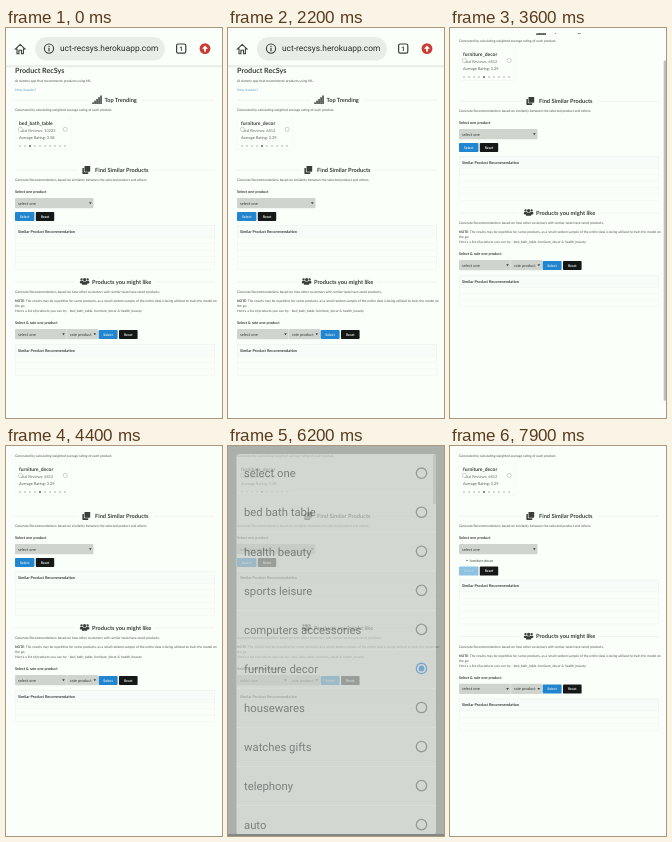
Recreate the animation shown at these times as an HTML page with a canvas. Size 216 by 390 pixels, loop 8 s.

```html
<!DOCTYPE html>
<html lang="en">
<head>
<meta charset="utf-8">
<title>Product RecSys</title>
<style>
  html, body { margin: 0; width: 100%; height: 100%; overflow: hidden; background: #fafffa; }
  canvas { display: block; width: 100vw; height: 100vh; }
</style>
</head>
<body>
<canvas id="stage"></canvas>
<script>
const W = 216, H = 390, LOOP = 8000, STEP = 100;
const BG = '#fafffa', DARK = '#2b2d2b', INK = '#3a3d3a', SOFT = '#505350';
const GREY = '#d0d4cf', BLUE = '#2185d0', BLACK = '#161817';
const LATO = 'Lato, sans-serif', ROBOTO = 'Roboto, sans-serif';
const canvas = document.getElementById('stage');
const ctx = canvas.getContext('2d');

const slides = [
  ['bed_bath_table', '10223', '3.58'],
  ['sports_leisure', '7529', '3.41'],
  ['furniture_decor', '6812', '3.29']
];
const options = ['select one', 'bed bath table', 'health beauty', 'sports leisure',
  'computers accessories', 'furniture decor', 'housewares', 'watches gifts', 'telephony', 'auto'];

// Linear interpolation through [time, value] pairs.
function keys(t, points) {
  let [t0, v0] = points[0];
  if (t <= t0) return v0;
  for (const [t1, v1] of points) {
    if (t <= t1) return v0 + (v1 - v0) * (t - t0) / (t1 - t0);
    t0 = t1;
    v0 = v1;
  }
  return v0;
}

function text(str, x, y, size, { bold = false, color = INK, font = LATO, align = 'left' } = {}) {
  ctx.font = `${bold ? 'bold ' : ''}${size}px ${font}`;
  ctx.fillStyle = color;
  ctx.textAlign = align;
  ctx.fillText(str, x, y + size * 0.34);
}

function rect(x, y, w, h, color) {
  ctx.fillStyle = color;
  ctx.fillRect(x, y, w, h);
}

function round(x, y, w, h, r, color) {
  ctx.fillStyle = color;
  ctx.beginPath();
  ctx.roundRect(x, y, w, h, r);
  ctx.fill();
}

function disc(x, y, r, color) {
  ctx.fillStyle = color;
  ctx.beginPath();
  ctx.arc(x, y, r, 0, Math.PI * 2);
  ctx.fill();
}

function ring(x, y, r, width, color) {
  ctx.strokeStyle = color;
  ctx.lineWidth = width;
  ctx.beginPath();
  ctx.arc(x, y, r, 0, Math.PI * 2);
  ctx.stroke();
}

function path(d, color, width) {
  const shape = new Path2D(d);
  if (width) {
    ctx.strokeStyle = color;
    ctx.lineWidth = width;
    ctx.stroke(shape);
  } else {
    ctx.fillStyle = color;
    ctx.fill(shape);
  }
}

function toolbar() {
  const icon = '#3c403c';
  rect(0, 0, W, 38, BG);
  const shade = ctx.createLinearGradient(0, 37.5, 0, 40);
  shade.addColorStop(0, 'rgba(60,70,60,.16)');
  shade.addColorStop(1, 'rgba(60,70,60,0)');
  rect(0, 37.5, W, 2.5, shade);
  path('M9.4 21H11V25.8H12.9V22.2H15.5V25.8H17.4V21H19L14.2 16.4Z', icon, 1.1);
  round(29, 9, 130, 23.6, 11.8, '#e8ede7');
  ring(43, 20.6, 4.6, 1.1, icon);
  rect(42.4, 17.9, 1.2, 1.3, icon);
  rect(42.4, 20, 1.2, 3.3, icon);
  text('uct-recsys.herokuapp.com', 54, 20.5, 8.35, { color: DARK, font: ROBOTO });
  ctx.strokeStyle = icon;
  ctx.lineWidth = 1.2;
  ctx.beginPath();
  ctx.roundRect(170.6, 16, 9.2, 9.2, 1.6);
  ctx.stroke();
  text('1', 175.2, 20.6, 6.5, { bold: true, color: icon, font: ROBOTO, align: 'center' });
  disc(199, 20.6, 5.4, '#cf3a34');
  path('M199 17.4L202 20.7H200V23.4H198V20.7H196Z', BG);
}

function heading(label, x, y, left, right) {
  const line = 'rgba(34,36,38,.09)';
  rect(9, y - 0.2, left - 9, 0.6, line);
  rect(right, y - 0.2, 209 - right, 0.6, line);
  text(label, x, y, 5.7, { bold: true });
}

function signalIcon() {
  for (let i = 0; i < 5; i++) {
    const h = 1.7 + i * 1.7;
    rect(86.3 + i * 2, 76 - h, 1.5, h, INK);
  }
}

function cloneIcon() {
  round(76.4, 140, 5.9, 5.9, 0.6, INK);
  round(77.9, 137.6, 6.6, 6.6, 0.6, BG);
  round(78.5, 138, 5.7, 5.7, 0.6, INK);
}

function usersIcon() {
  for (const x of [75.6, 81.6]) {
    disc(x, 251.4, 1.2, INK);
    round(x - 1.8, 253, 3.6, 2.4, 1, INK);
  }
  disc(78.6, 251.8, 1.9, BG);
  disc(78.6, 251.6, 1.6, INK);
  round(76, 253.6, 5.2, 3.2, [1.6, 1.6, 0.5, 0.5], INK);
}

function carousel(pos, dot) {
  rect(8.8, 88, 56.4, 34, 'rgba(34,36,38,.04)');
  rect(9.2, 88.2, 55.5, 33.2, BG);
  ctx.save();
  ctx.beginPath();
  ctx.rect(9, 88, 56, 26);
  ctx.clip();
  slides.forEach(([name, reviews, rating], i) => {
    const x = 13 + (i - pos) * 56;
    text(name, x, 95.2, 4.95, { bold: true });
    text('Total Reviews: ' + reviews, x, 102.7, 3.9, { color: '#6a6d6a' });
    text('Average Rating: ' + rating, x, 110, 3.9, { color: '#5a5d5a' });
  });
  ctx.restore();
  for (const x of [14.4, 59.2]) {
    disc(x, 101.4, 2.1, BG);
    ring(x, 101.4, 2.1, 0.5, '#a3a7a3');
  }
  for (let i = 0; i < 10; i++) {
    const on = i === dot;
    disc(14 + i * 5, 118, on ? 1 : 0.8, on ? '#606460' : '#a3a7a3');
  }
}

function select(label, x, y, w) {
  round(x, y, w, 10.2, 0.8, GREY);
  text(label, x + 3, y + 5.2, 4);
  const cx = x + w - 3.2, cy = y + 4.3;
  path(`M${cx - 1.3} ${cy}h2.6l-1.3 1.9z`, INK);
}

function button(label, x, y, w, color) {
  round(x, y, w, 9, 0.9, color);
  text(label, x + w / 2, y + 4.5, 3.5, { bold: true, color: '#e8eeea', align: 'center' });
}

function table(y, rows) {
  const line = 'rgba(34,36,38,.06)', h = 12 + rows * 6.4;
  rect(9, y, 200, 12, '#f7fcf8');
  for (let i = 0; i <= rows; i++) rect(9, y + 12 + i * 6.4, 200, 0.5, line);
  rect(9, y, 200, 0.5, line);
  rect(9, y, 0.5, h, line);
  rect(208.5, y, 0.5, h, line);
  text('Similar Product Recommendation', 12, y + 6.4, 3.85, { bold: true });
}

function page(t) {
  const pos = keys(t, [[900, 0], [1000, 0.2], [1100, 0.65], [1200, 0.92], [1300, 1],
    [1600, 1], [1700, 1.2], [1800, 1.65], [1900, 1.92], [2000, 2]]);
  const dot = t < 1000 ? 2 : t < 1700 ? 3 : 4;
  const added = t >= 7600;
  const body = (str, y) => text(str, 9, y, 3.37, { color: SOFT });

  text('Product RecSys', 9, 42.2, 7.2, { bold: true });
  body('AI dummy app that recommends products using ML.', 53);
  text('How it works?', 9, 62, 3.37, { color: '#5a90c8' });
  heading('Top Trending', 98.4, 72, 83, 136);
  signalIcon();
  body('Generated by calculating weighted average rating of each product.', 82);
  carousel(pos, dot);

  heading('Find Similar Products', 89, 142, 72, 147);
  cloneIcon();
  body('Generate Recommendations based on similarity between the selected product and others.', 152);
  text('Select one product', 9, 163.6, 3.75, { bold: true });
  select(t >= 6200 && !added ? 'furniture decor' : 'select one', 9, 170, 78.5);

  ctx.save();
  if (added) {
    disc(17, 186.4, 0.6, INK);
    text('furniture decor', 19.5, 186.4, 3.6);
    ctx.translate(0, 8.7);
  }
  ctx.globalAlpha = keys(t, [[7200, 1], [7600, 0.5]]);
  button('Select', 9, 183.9, 19.4, BLUE);
  ctx.globalAlpha = 1;
  button('Reset', 29.8, 183.9, 18.4, BLACK);
  table(197, 5);

  heading('Products you might like', 86, 253.8, 69, 149);
  usersIcon();
  body('Generate Recommendations based on how other customers with similar taste have rated products.', 264);
  text('NOTE', 9, 273.3, 3.37, { bold: true });
  const noteWidth = ctx.measureText('NOTE').width;
  text(': The results may be repetitive for some products, as a small random sample of the entire data is being utilised to train the model on',
    9 + noteWidth, 273.3, 3.37, { color: SOFT });
  body('the go.', 278);
  body("Here's a list of products you can try - bed_bath_table, furniture_decor & health_beauty.", 282.8);
  text('Select & rate one product', 9, 294.6, 3.75, { bold: true });
  select('select one', 9, 301, 51.7);
  select('rate product', 61, 301, 31);
  button('Select', 92.6, 301.9, 19, BLUE);
  button('Reset', 113, 301.9, 18.6, BLACK);
  table(316, 3);
  ctx.restore();
}

function picker(alpha, chosen) {
  ctx.globalAlpha = alpha;
  rect(0, 0, W, H, '#5f635e');
  round(8.5, 8, 199.5, 380, 2.5, BG);
  options.forEach((label, i) => {
    const y = 27.6 + i * 39.05;
    text(label, 16, y, 11.3, { color: DARK, font: ROBOTO });
    if (i) rect(8.5, y - 20, 199.5, 0.8, '#e0e5df');
    const on = i === chosen;
    ring(193.5, y - 0.4, 5.2, 1.3, on ? '#1f76cc' : '#5c605b');
    if (on) disc(193.5, y - 0.4, 2.9, '#1f76cc');
  });
  rect(205, 9, 3, 49, '#b3b7b2');
  rect(0, 388, W, 2, '#5f635e');
  ctx.globalAlpha = 1;
}

function draw(t) {
  const scroll = keys(t, [[2900, 0], [3000, 5], [3100, 17], [3200, 32], [3300, 47],
    [3400, 58], [3500, 65], [3600, 69], [3700, 71], [3800, 72]]);
  rect(0, 0, W, H, BG);
  ctx.save();
  ctx.translate(0, -scroll);
  page(t);
  ctx.restore();

  ctx.save();
  ctx.translate(0, -Math.min(scroll, 40));
  toolbar();
  ctx.restore();
  rect(0, 0, W, 5, BG);

  const thumb = keys(t, [[3200, 0], [3300, 0.35], [3800, 0.35], [3900, 0.28], [4100, 0.28], [4400, 0]]);
  if (thumb) rect(213.7, 5 + Math.max(0, scroll - 34) * 0.79, 2.3, 340, `rgba(70,74,70,${thumb})`);

  const shown = keys(t, [[4800, 0], [4900, 0.5], [5000, 1], [6100, 1], [6200, 0.5], [6300, 0]]);
  if (shown) picker(shown, t < 6200 ? 0 : 5);
}

function resize() {
  const ratio = window.devicePixelRatio || 1;
  canvas.width = Math.round(innerWidth * ratio);
  canvas.height = Math.round(innerHeight * ratio);
}

function frame() {
  const t = Math.floor(performance.now() % LOOP / STEP) * STEP;
  ctx.setTransform(canvas.width / W, 0, 0, canvas.height / H, 0, 0);
  ctx.textRendering = 'geometricPrecision';
  draw(t);
  requestAnimationFrame(frame);
}

addEventListener('resize', resize);
resize();
frame();
</script>
</body>
</html>
```
